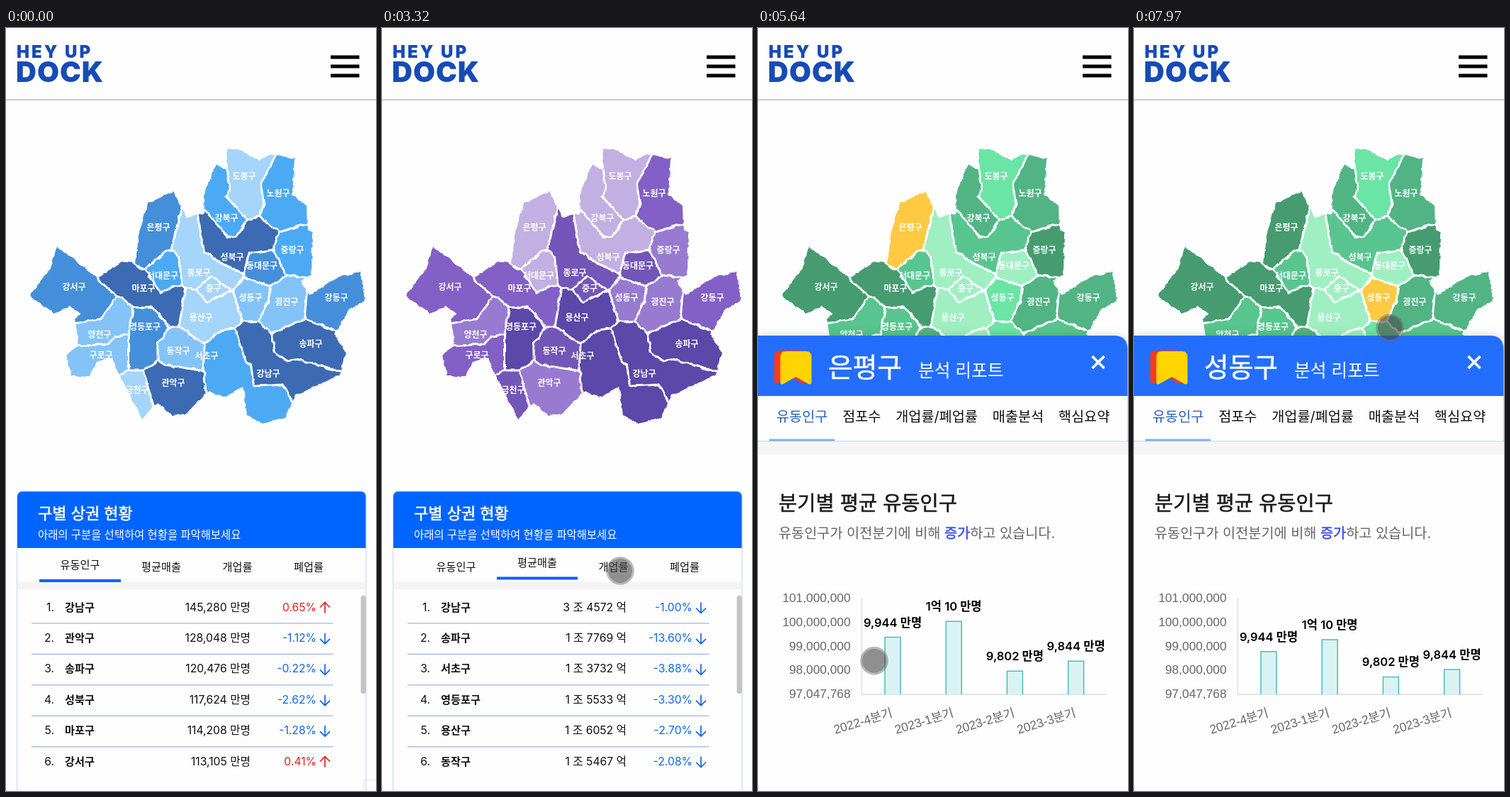
An HTML page that plays this animation: 522 by 1074 pixels, repeating every 8000 ms.

```html
<!DOCTYPE html>
<html lang="ko">
<head>
<meta charset="utf-8">
<style>
html, body { margin: 0; width: 100%; height: 100%; overflow: hidden; background: #fefefe; }
svg { display: block; width: 522px; height: 1074px; font-family: Inter, "Noto Sans CJK KR", "Noto Sans CJK", sans-serif; }
.district { stroke-width: 1; }
.district-name { fill: #fff; font-size: 12px; font-weight: 600; text-anchor: middle; }
.row { font-size: 15.7px; fill: #111; }
.row .name { font-size: 15.2px; font-weight: 600; }
.end { text-anchor: end; }
.mid { text-anchor: middle; }
.medium { stroke-width: .55px; }
.axis { font: 17.3px "Liberation Sans", "Noto Sans CJK KR", sans-serif; fill: #666; }
</style>
</head>
<body>
<svg id="stage" viewBox="0 0 522 1074"></svg>
<script>
const LOOP = 8000;
const HIGHLIGHT = '#ffca41';

const palettes = [
  ['#a5d5fa', '#83c3f8', '#4caaf5', '#458fda', '#3d6bb3'],
  ['#c2b0e2', '#987bd0', '#8360c5', '#7456b8', '#5b48a8'],
  ['#f6bfd0', '#f2a0ba', '#ea7fa2', '#db6a90', '#c2557c'],
  ['#9fefc2', '#6ae5a5', '#58c590', '#52b485', '#469c70']
];

// Each district: name, shade per tab, seed points of its Voronoi cells, label point if it is not the first seed.
const districts = [
  ['강서구', '3244', [[96, 364], [125, 390]]],
  ['은평구', '3024', [[215, 280], [192, 313]]],
  ['마포구', '4234', [[194, 366], [165, 345], [236, 388]]],
  ['서대문구', '2022', [[221, 348]]],
  ['종로구', '0310', [[272, 344], [264, 292], [306, 348]]],
  ['도봉구', '0001', [[336, 208], [340, 240]]],
  ['강북구', '2013', [[311, 267], [292, 215]]],
  ['노원구', '2223', [[384, 232], [387, 256]]],
  ['성북구', '4012', [[319, 322], [286, 288], [355, 296]]],
  ['중랑구', '2134', [[404, 312]]],
  ['동대문구', '3320', [[361, 334]]],
  ['중구', '0340', [[293, 366]]],
  ['성동구', '1141', [[345, 379]]],
  ['광진구', '1133', [[396, 385], [390, 402]]],
  ['강동구', '3243', [[466, 379], [450, 390]]],
  ['송파구', '4412', [[430, 444], [405, 438]]],
  ['용산구', '0400', [[275, 407], [305, 391], [262, 392]]],
  ['영등포구', '3432', [[196, 420], [185, 455]]],
  ['양천구', '1122', [[132, 431], [155, 412]]],
  ['구로구', '1201', [[134, 460], [160, 455]]],
  ['동작구', '1303', [[243, 454]]],
  ['관악구', '4144', [[236, 499], [215, 500]]],
  ['금천구', '0301', [[185, 509]]],
  ['서초구', '2410', [[316, 458], [325, 492], [372, 520]], [283, 461]],
  ['강남구', '4441', [[370, 486], [349, 447], [415, 495]]]
].map(([name, shades, seeds, label = seeds[0]]) => ({ name, shades, seeds, label }));

const coast = 'M33 377L62 340 72 308 130 352 163 329 183 331 187 292 200 247 236 230 255 266 280 262 279 235 297 191 313 201 ' +
  '311 170 331 172 357 187 374 177 407 184 404 235 424 250 425 284 432 288 431 348 416 356 428 376 470 350 500 344 506 383 485 396 ' +
  '463 432 480 457 472 488 408 517 393 549 362 557 340 545 335 505 310 519 284 512 254 543 235 546 214 527 192 551 155 478 150 463 ' +
  '128 470 117 490 92 490 86 460 103 445 97 410 106 402 90 392 68 402Z';

const tabEdges = [47, 162, 276, 377, 477];
const tabs = [
  { label: '유동인구', unit: '만명', start: -1000, rows: [
    '강남구|145,280|0.65', '관악구|128,048|-1.12', '송파구|120,476|-0.22', '성북구|117,624|-2.62', '마포구|114,208|-1.28',
    '강서구|113,105|0.41', '영등포구|108,538|0.35', '강동구|106,643|0.05', '동대문구|103,704|-3.59', '은평구|102,915|-0.47'] },
  { label: '평균매출', unit: '억', start: 2600, rows: [
    '강남구|3 조 4572|-1.00', '송파구|1 조 7769|-13.60', '서초구|1 조 3732|-3.88', '영등포구|1 조 5533|-3.30',
    '용산구|1 조 6052|-2.70', '동작구|1 조 5467|-2.08'] },
  { label: '개업률', unit: '개', start: 3430, rows: [
    '강남구|3.28|-1.45', '성동구|3.21|0.82', '강동구|3.17|-2.36', '중구|3.12|1.14', '관악구|3.08|-0.63', '마포구|3.05|-1.92'] },
  { label: '폐업률', unit: '개', start: 4220, rows: [
    '중랑구|3.43|-1.67', '강서구|3.42|-0.24', '은평구|3.41|1.80', '마포구|3.36|8.30', '관악구|3.32|-2.21', '광진구|3.31|1.29'] }
];

const reports = [
  { name: '은평구', start: 5090, close: 6590, reset: 6690 },
  { name: '성동구', start: 7750, close: LOOP, reset: LOOP }
];

const bars = [
  { value: 99.44, text: '9,944 만명', quarter: '2022-4분기' },
  { value: 100.1, text: '1억 10 만명', quarter: '2023-1분기' },
  { value: 98.02, text: '9,802 만명', quarter: '2023-2분기' },
  { value: 98.44, text: '9,844 만명', quarter: '2023-3분기' }
];
const barX = i => 179 + i * 86.2;
const CHART_MIN = 97.047768;

const moves = [
  { from: 270, to: 680, x: 182, y: 838 },
  { from: 2150, to: 2500, x: 205, y: 760 },
  { from: 3190, to: 3320, x: 336, y: 764 },
  { from: 4110, to: 4220, x: 425, y: 760 },
  { from: 4240, to: 4620, x: 162, y: 916 },
  { from: 4640, to: 4960, x: 117, y: 922 },
  { from: 5100, to: 5850, x: 168, y: 888 },
  { from: 5920, to: 6390, x: 480, y: 471 },
  { from: 6590, to: 6690, x: 560, y: 455 },
  { from: 7060, to: 7360, x: 343, y: 395 },
  { from: 7750, to: 7970, x: 361, y: 422 }
];

const clamp = v => Math.max(0, Math.min(1, v));
const progress = (t, start, length) => clamp((t - start) / length);
const easeOut = p => 1 - (1 - p) ** 2;
const sineOut = p => Math.sin(p * Math.PI / 2);
const rgb = hex => [1, 3, 5].map(i => parseInt(hex.slice(i, i + 2), 16));
const mix = (a, b, p) => a.map((v, i) => v + (b[i] - v) * p);

const text = (x, y, value, attrs = '') => `<text x="${x}" y="${y}" ${attrs}>${value}</text>`;
const rect = (x, y, w, h, fill, attrs = '') => `<rect x="${x}" y="${y}" width="${w}" height="${h}" fill="${fill}" ${attrs}/>`;

// Keeps the part of a cell nearer to a than to b; each vertex remembers who lies across its outgoing edge.
function clipCell(cell, a, b, owner) {
  const side = p => (a[0] - b[0]) * (p.x - (a[0] + b[0]) / 2) + (a[1] - b[1]) * (p.y - (a[1] + b[1]) / 2);
  return cell.flatMap((p, i) => {
    const q = cell[(i + 1) % cell.length];
    const sp = side(p), sq = side(q);
    const kept = sp >= 0 ? [p] : [];
    if ((sp >= 0) !== (sq >= 0)) {
      const k = sp / (sp - sq);
      kept.push({ x: p.x + (q.x - p.x) * k, y: p.y + (q.y - p.y) * k, owner: sp >= 0 ? owner : p.owner });
    }
    return kept;
  });
}

function buildMap() {
  const seeds = districts.flatMap(owner => owner.seeds.map(at => ({ at, owner })));
  const point = p => `${p.x.toFixed(1)} ${p.y.toFixed(1)}`;
  let borders = '';
  districts.forEach(d => d.outline = '');
  for (const { at, owner } of seeds) {
    let cell = [[0, 150], [522, 150], [522, 580], [0, 580]].map(([x, y]) => ({ x, y, owner }));
    for (const other of seeds) if (other.at !== at) cell = clipCell(cell, at, other.at, other.owner);
    owner.outline += `M${cell.map(point).join('L')}Z`;
    cell.forEach((p, i) => {
      if (p.owner !== owner) borders += `M${point(p)}L${point(cell[(i + 1) % cell.length])}`;
    });
  }
  return `
    <clipPath id="coast"><path d="${coast}"/></clipPath>
    <filter id="rough" x="-2%" y="-2%" width="104%" height="104%" color-interpolation-filters="sRGB">
      <feTurbulence type="fractalNoise" baseFrequency=".1" numOctaves="2" seed="4"/>
      <feDisplacementMap in="SourceGraphic" scale="5" xChannelSelector="R" yChannelSelector="G"/>
    </filter>
    <g filter="url(#rough)"><g clip-path="url(#coast)">
      ${districts.map(d => `<path class="district" d="${d.outline}"/>`).join('')}
      <path d="${borders}" stroke="#fff" stroke-width="3" stroke-linecap="round"/>
    </g></g>
    ${districts.map(({ name, label: [x, y] }) => text(x, y + 4.5, name, 'class="district-name"')).join('')}`;
}

function rowMarkup(tab, row, i) {
  const [name, value, change] = row.split('|');
  const down = change.startsWith('-');
  const color = down ? '#0d68e8' : '#e0231b';
  const y = 815 + i * 43.4;
  return `<g class="row">
    ${text(68, y + 5.5, i + 1 + '.', 'class="end"')}
    ${text(83, y + 5.5, name, 'class="name"')}
    ${text(345, y + 5.5, `${value} ${tab.unit}`, 'class="end"')}
    ${text(438, y + 5.5, change + '%', `class="end" fill="${color}"`)}
    <path d="M0 -7.5V7.5M-7 .5L0 7.5 7 .5" transform="translate(450 ${y + 1}) scale(1 ${down ? 1 : -1})" fill="none" stroke="${color}" stroke-width="1.7"/>
    <path d="M36 ${y + 23}H461.5" stroke="#adc3e6" stroke-width="1.6"/></g>`;
}

const header = `
  <g fill="#174bb5" font-weight="900">
    ${text(15, 42, 'HEY UP', 'font-size="24" letter-spacing="3"')}
    ${text(14, 76, 'DOCK', 'font-size="40" letter-spacing="1"')}
  </g>
  <path d="M458 41H498.5M458 54H498.5M458 67H498.5" stroke="#000" stroke-width="4.8"/>
  <path d="M0 101H522" stroke="#bdbdbd" stroke-width="1.6"/>`;

const card = `
  <path d="M15.5 1080V660Q15.5 652 23.5 652H500Q508 652 508 660V1080" fill="#fefefe" stroke="#cfe0f7" stroke-width="1.4"/>
  <path d="M16 732V660Q16 652.5 23.5 652.5H500Q507.5 652.5 507.5 660V732Z" fill="#0064ff"/>
  ${text(45, 691, '구별 상권 현황', 'class="medium" font-size="22" fill="#fff" stroke="#fff"')}
  ${text(45, 719, '아래의 구분을 선택하여 현황을 파악해보세요', 'font-size="15.4" fill="#fff"')}
  ${rect(16, 780, 491.5, 10, '#f3f3f3')}
  ${tabs.map((tab, i) => text((tabEdges[i] + tabEdges[i + 1]) / 2, 0, tab.label, 'class="tab mid" font-size="15.2" fill="#111"')).join('')}
  <rect id="underline" height="4" fill="#0064ff"/>
  <clipPath id="listClip">${rect(30, 799, 470, 245, '#000')}</clipPath>
  <g clip-path="url(#listClip)"><g id="list">
    ${tabs.map(tab => `<g class="rows">${tab.rows.map((row, i) => rowMarkup(tab, row, i)).join('')}</g>`).join('')}
  </g></g>
  <rect id="thumb" x="500.5" width="7.5" height="138" rx="3.5" fill="#c5c5c5"/>
  <path id="corner" d="M505 1074V1058.5H522" fill="none" stroke="#e6e6e6"/>`;

const menu = ['점포수', '개업률/폐업률', '매출분석', '핵심요약'];
const ticks = ['101,000,000', '100,000,000', '99,000,000', '98,000,000', '97,047,768'];
const bookmark = 'M8 0H36Q44 0 44 8V43Q44 49 38 45L22 36 6 45Q0 49 0 43V8Q0 0 8 0Z';

const report = `<g id="report">
  <path d="M0 1074V433H502Q522 433 522 453V1074Z" fill="#fefefe" style="filter:drop-shadow(0 0 7px rgba(0,0,0,.16))"/>
  <path d="M0 518V433H502Q521.5 433 521.5 453V518Z" fill="#246eff"/>
  <path d="${bookmark}" transform="translate(23 454)" fill="#fb3a1c"/>
  <path d="${bookmark}" transform="translate(31.5 455)" fill="#ffd400"/>
  ${text(99, 491, '', 'id="place" class="medium" font-size="37.7" fill="#fff" stroke="#fff"')}
  ${text(226, 491, '분석 리포트', 'font-size="24.7" fill="#fff"')}
  <path d="M471.5 462L488.5 479M488.5 462L471.5 479" stroke="#fff" stroke-width="3.6"/>
  ${text(26, 554, '<tspan fill="#2563bd">유동인구</tspan>' + menu.map(item => `<tspan dx="20.7">${item}</tspan>`).join(''), 'font-size="19.7" fill="#111"')}
  <path d="M0 581.5H521.5V518" fill="none" stroke="#c3d8f8" stroke-width="1.2"/>
  ${rect(16, 578.5, 92, 3, '#7db4ef')}
  ${rect(0, 582.5, 522, 17.5, '#f5f5f5')}
  ${text(29, 679, '분기별 평균 유동인구', 'class="medium" font-size="28.5" fill="#1c1c1c" stroke="#1c1c1c"')}
  ${text(29, 718, '유동인구가 이전분기에 비해 <tspan class="medium" fill="#3c50ea" stroke="#3c50ea">증가</tspan>하고 있습니다.', 'font-size="19.7" fill="#666"')}
  ${ticks.map((label, i) => text(130.5, 808 + i * 33.8, label, 'class="axis end"')).join('')}
  <path d="M146.5 802V938H492" fill="none" stroke="#dcdcdc" stroke-width="1.3"/>
  ${bars.map((bar, i) => `<path class="bar" fill="#dbf2f2" stroke="#4bbdbd" stroke-width="1.5"/>
    ${text(barX(i) + 11, 0, bar.text, 'class="bar-label mid" font-size="16.5" font-weight="600" fill="#000"')}
    ${text(0, 6, bar.quarter, `class="axis end" transform="translate(${barX(i) + 10} 963) rotate(-17)"`)}`).join('')}
</g>`;

const pointer = `<g id="pointer">
  <circle r="17" fill="#464646" fill-opacity=".6"/>
  <circle r="18.3" fill="none" stroke="#646464" stroke-opacity=".45" stroke-width="3"/></g>`;

const stage = document.getElementById('stage');
stage.innerHTML = rect(0, 0, 522, 1074, '#fefefe') + header + buildMap() + card + report + pointer;
const byId = id => document.getElementById(id);
const all = selector => [...stage.querySelectorAll(selector)];
const shapes = all('.district');
const tabLabels = all('.tab');
const rowGroups = all('.rows');
const barShapes = all('.bar');
const barLabels = all('.bar-label');
const show = (node, visible) => node.setAttribute('display', visible ? 'inline' : 'none');

function paintMap(t, active) {
  const change = easeOut(progress(t, tabs[active].start, 380));
  const previous = Math.max(0, active - 1);
  districts.forEach(({ name, shades }, i) => {
    const shade = tab => rgb(palettes[tab][shades[tab]]);
    let color = mix(shade(previous), shade(active), change);
    for (const r of reports.filter(r => r.name === name)) {
      const glow = easeOut(progress(t, r.start, 240)) * (1 - easeOut(progress(t, r.reset, 350)));
      color = mix(color, rgb(HIGHLIGHT), glow);
    }
    const fill = `rgb(${color.map(Math.round)})`;
    if (shapes[i].getAttribute('fill') === fill) return;
    shapes[i].setAttribute('fill', fill);
    shapes[i].setAttribute('stroke', fill);
  });
}

function paintCard(t, active) {
  const hovered = active > 0 && t < 5100;
  tabLabels.forEach((node, i) => node.setAttribute('y', i !== active ? 763.5 : hovered ? 758 : 760.5));
  const line = byId('underline');
  line.setAttribute('x', tabEdges[active]);
  line.setAttribute('width', tabEdges[active + 1] - tabEdges[active]);
  line.setAttribute('y', hovered ? 772.5 : 776);
  rowGroups.forEach((node, i) => show(node, i === active));
  const scroll = 190 * (sineOut(progress(t, 810, 490)) - sineOut(progress(t, 1780, 400)));
  byId('list').setAttribute('transform', `translate(0 ${-scroll})`);
  byId('thumb').setAttribute('y', 799 + scroll * 245 / 435);
  show(byId('corner'), t < 70);
}

function paintReport(t) {
  const open = reports.find(r => t >= r.start && t < r.close);
  show(byId('report'), open);
  if (!open) return;
  byId('place').textContent = open.name;
  const growth = 1 - (1 - progress(t, open.start - 60, 1000)) ** 4;
  bars.forEach((bar, i) => {
    const top = 938 - (bar.value - CHART_MIN) / (101 - CHART_MIN) * 136 * growth;
    barShapes[i].setAttribute('d', `M${barX(i)} 938V${top}h22V938`);
    barLabels[i].setAttribute('y', top - 15);
  });
}

function paintPointer(t) {
  let at = [545, 1050];
  for (const { from, to, x, y } of moves) at = mix(at, [x, y], easeOut(progress(t, from, to - from)));
  byId('pointer').setAttribute('transform', `translate(${at})`);
}

function render(t) {
  const active = tabs.filter(tab => tab.start <= t).length - 1;
  paintMap(t, active);
  paintCard(t, active);
  paintReport(t);
  paintPointer(t);
}

const started = performance.now();
function tick() {
  render((performance.now() - started) % LOOP);
  requestAnimationFrame(tick);
}
tick();
</script>
</body>
</html>
```
